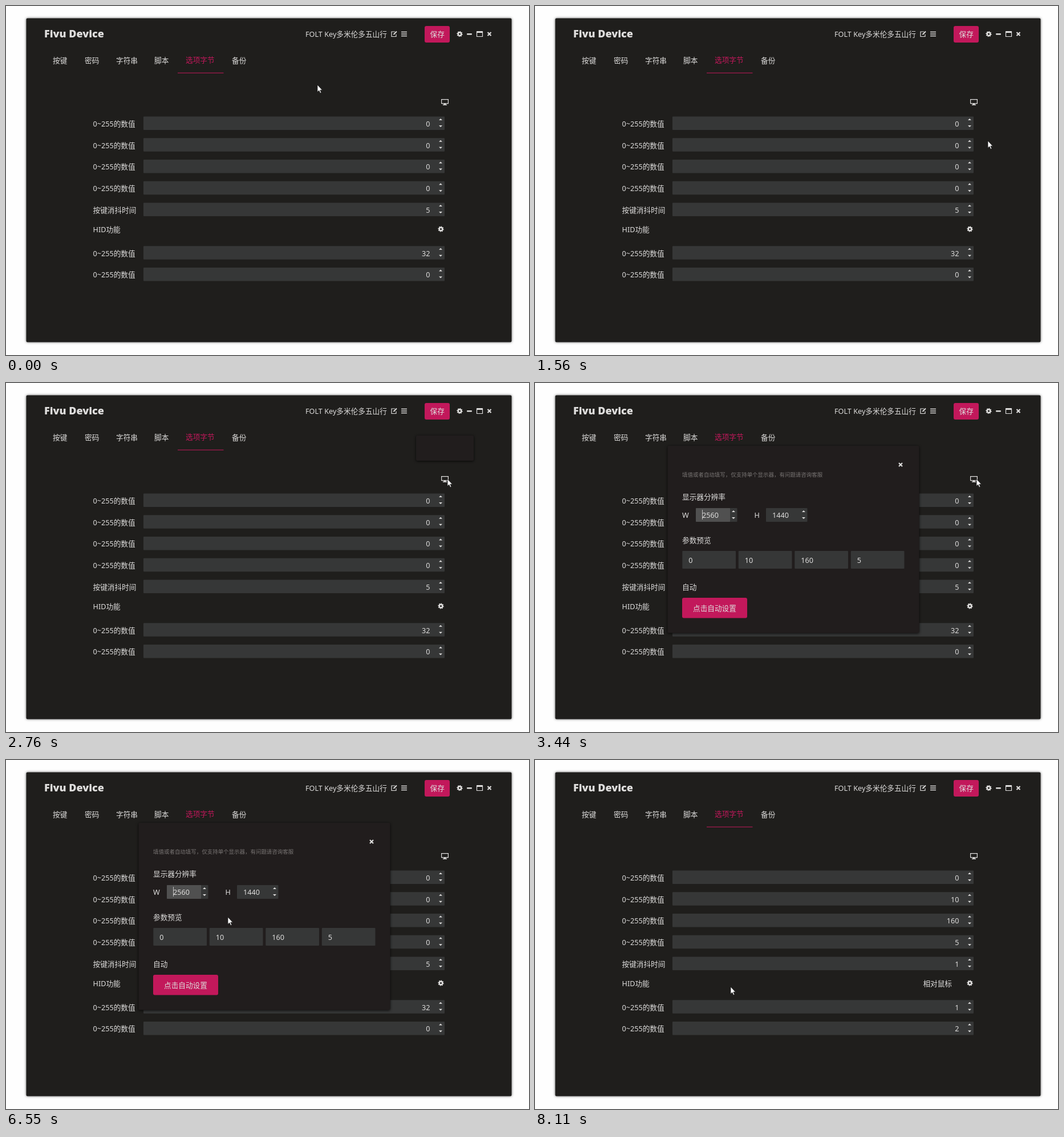
Recreate the animation shown at these times as an HTML page. Size 917x611 px, loop 8630 ms.

```html
<!DOCTYPE html>
<html lang="zh-CN">
<head>
<meta charset="utf-8">
<title>Device settings</title>
<style>
  html, body { margin: 0; width: 100%; height: 100%; overflow: hidden; background: #fefefe; }
  svg { display: block; width: 917px; height: 611px; }
  text { font: 12.67px "Noto Sans", "Noto Sans CJK SC", "Noto Sans CJK", sans-serif; fill: #dedddc; white-space: pre; }
  .brand { font: 800 18px "Open Sans", "Noto Sans", sans-serif; font-stretch: 75%; }
  .hint { font-size: 9.47px; fill: #787473; }
  .pink { fill: #c2185b; }
  .end { text-anchor: end; }
  .line { fill: none; stroke: #dedddc; }
  .window { filter: drop-shadow(0 0 2px #0009); }
  .panel { filter: drop-shadow(0 1px 2px #000c); }
</style>
</head>
<body>
<svg id="stage" viewBox="0 0 917 611"></svg>
<script>
const LOOP = 8630, STEP = 172.4;
const DIALOG_OPEN = 20, FOCUS_LOST = 43, DIALOG_CLOSED = 44;
const FIELD = '#363737', ACTIVE = '#505050', LIGHT = '#dedddc', PINK = '#c2185b';

// Pointer path: step, x, y
const path = [
  [0, 546, 138], [1, 552, 150], [2, 575, 185], [4, 655, 298], [5, 692, 334], [6, 715, 344],
  [7, 738, 325], [9, 794, 236], [10, 806, 205], [11, 803, 190], [12, 803, 190],
  [14, 778, 175], [15, 774, 168], [21, 774, 168], [22, 765, 172], [25, 640, 225],
  [27, 530, 247], [28, 495, 246], [31, 445, 243], [32, 355, 241], [33, 265, 222],
  [34, 300, 190], [35, 405, 207], [36, 405, 207], [37, 408, 225], [39, 370, 325],
  [41, 319, 399], [45, 319, 399], [46, 332, 398], [47, 343, 397], [50, 343, 397]
];
const tabs = [['按键', 82], ['密码', 138], ['字符串', 193], ['脚本', 260], ['备份', 396]];
const NUMBER = '0~255的数值';
const rows = [
  [NUMBER, 205.5, 0, 0], [NUMBER, 243.3, 0, 10], [NUMBER, 281, 0, 160], [NUMBER, 318.8, 0, 5],
  ['按键消抖时间', 356.6, 5, 1], [NUMBER, 432.3, 32, 1], [NUMBER, 470, 0, 2]
];

const text = (x, y, str, cls = '') => `<text x="${x}" y="${y + 4.8}" class="${cls}">${str}</text>`;
const box = (x, y, w, h, fill, r = 1) =>
  `<rect x="${x}" y="${y}" width="${w}" height="${h}" rx="${r}" fill="${fill}"/>`;
const shape = (d, fill = LIGHT) => `<path d="${d}" fill="${fill}"/>`;
const line = (d, width) => `<path d="${d}" class="line" stroke-width="${width}"/>`;
const cross = (x, y) => line(`M${x - 3} ${y - 3}l6 6m0-6l-6 6`, 2.2);
const spinner = (x, y) => shape(`M${x - 3} ${y - 5}l3-3 3 3zM${x - 3} ${y + 4}l3 3 3-3z`);
const gear = (x, y) => `<circle cx="${x}" cy="${y}" r="2.8" class="line" stroke-width="2.4"/>
  <circle cx="${x}" cy="${y}" r="4.3" class="line" stroke-width="1.6" pathLength="16" stroke-dasharray="1"/>`;
const inside = (p, x, y, w, h) => p.x >= x && p.x < x + w && p.y >= y && p.y < y + h;

function pointerAt(k) {
  const i = path.findIndex(p => p[0] > k);
  const [a, x, y] = path[i - 1], [b, x2, y2] = path[i];
  const f = (k - a) / (b - a);
  return { x: x + (x2 - x) * f, y: y + (y2 - y) * f };
}

function header() {
  return text(67, 50.5, 'Fivu Device', 'brand')
    + text(525, 49.5, 'FOLT Key多米伦多五山行')
    + line('M682 45h-6v8.500h8v-4', 1.2) + line('M679.500 50l5.500-5.500', 2)
    + line('M693 45.500h10m-10 3.500h10m-10 3.500h10', 1.7)
    + box(734, 35, 44, 29, PINK, 3) + text(743.5, 49.5, '保存')
    + gear(795.5, 49) + box(808, 48, 9, 2.4, LIGHT)
    + line('M825.500 45v8.500h10v-8.500z', 1.2) + box(825, 44, 11, 3, LIGHT)
    + cross(847.5, 49)
    + tabs.map(([name, x]) => text(x, 95, name)).join('')
    + text(315, 94, '选项字节', 'pink') + box(301, 116.7, 80.5, 1, PINK, 0)
    + line('M763.600 163.600h11.800v7h-11.800z', 1.2) + shape('M768 171h3v1.300h2v1.400h-7v-1.400h2z');
}

function settings(p, k) {
  const done = k >= DIALOG_CLOSED, covered = k >= DIALOG_OPEN;
  const list = rows.map(([label, y, before, after]) => {
    const hover = !covered && inside(p, 241, y - 12, 515, 23.5);
    return text(152.5, y + .5, label) + box(241, y - 12, 528, 23.5, FIELD)
      + (hover ? box(241, y - 12, 515, 23.5, ACTIVE) : '')
      + text(743.5, y + .5, done ? after : before, 'end') + spinner(762, y - .5);
  }).join('');
  return list + text(152.5, 391, 'HID功能') + gear(762.5, 390.5)
    + (done ? text(731, 391, '相对鼠标', 'end') : '');
}

function sizeField(x, label, labelX, value, active) {
  return text(labelX, 231, label) + box(x, 219, 72.5, 24, FIELD)
    + (active ? box(x, 219, 60, 24, ACTIVE) : '')
    + text(x + 11, 231, value) + spinner(x + 66, 231);
}

function dialog(p, k) {
  const focused = k < FOCUS_LOST;
  const caretOn = focused && Math.floor((k - DIALOG_OPEN) * STEP / 500) % 2 === 0;
  return `<g class="panel">${box(232.5, 110, 441, 327.5, '#211d1d', 2)}</g>`
    + cross(641, 143)
    + text(258, 159.5, '填值或者自动填写，仅支持单个显示器，有问题请咨询客服', 'hint')
    + text(258, 199.5, '显示器分辨率')
    + sizeField(282, 'W', 258, 2560, focused)
    + sizeField(405, 'H', 384.5, 1440, inside(p, 405, 219, 60, 25))
    + (caretOn ? box(293, 222, .8, 17, LIGHT, 0) : '')
    + text(258, 275.5, '参数预览')
    + [0, 10, 160, 5].map((value, i) => {
        const x = 258.3 + i * 98.5;
        return box(x, 294, 93.7, 31, FIELD) + text(x + 11, 310, value);
      }).join('')
    + text(258, 357, '自动')
    + box(258, 376, 114, 35.5, focused ? PINK : '#ff458a', 3)
    + text(277, 394, '点击自动设置');
}

function popover(k) {
  return `<g class="panel" opacity="${k === 15 ? .5 : 1}">${box(719, 92, 101, 44, '#211d1d', 2)}</g>`;
}

function pointer(p, k) {
  const hand = k >= 40 && k < DIALOG_CLOSED;
  const d = hand
    ? 'M-1.500 10V1.500Q0-.5 1.500 1.500V6.500Q3 5.500 4 7 5.500 6 6.500 7.500 8 7 8 9V12.500L6.500 17H-.5L-5 11Q-4.500 8-1.500 10.500Z'
    : 'M0 0V12.500L2.800 9.900 4.900 14.500 6.800 13.700 4.800 9.200H8.600Z';
  return `<path d="${d}" transform="translate(${p.x} ${p.y})" fill="#fff" stroke="#111" stroke-width=".7"/>`;
}

function scene(k) {
  const p = pointerAt(k);
  return `<g class="window">${box(35.5, 21.5, 851, 567, '#1f1e1c', 2)}</g>`
    + header() + settings(p, k)
    + (k >= 15 && k < DIALOG_OPEN ? popover(k) : '')
    + (k >= DIALOG_OPEN && k < DIALOG_CLOSED ? dialog(p, k) : '')
    + pointer(p, k);
}

const stage = document.getElementById('stage');
let shown = -1;
function draw() {
  // The picture is a screen capture and advances in even steps.
  const k = Math.min(49, Math.floor((performance.now() % LOOP + 9) / STEP));
  if (k !== shown) stage.innerHTML = scene(shown = k);
  requestAnimationFrame(draw);
}
draw();
</script>
</body>
</html>
```
